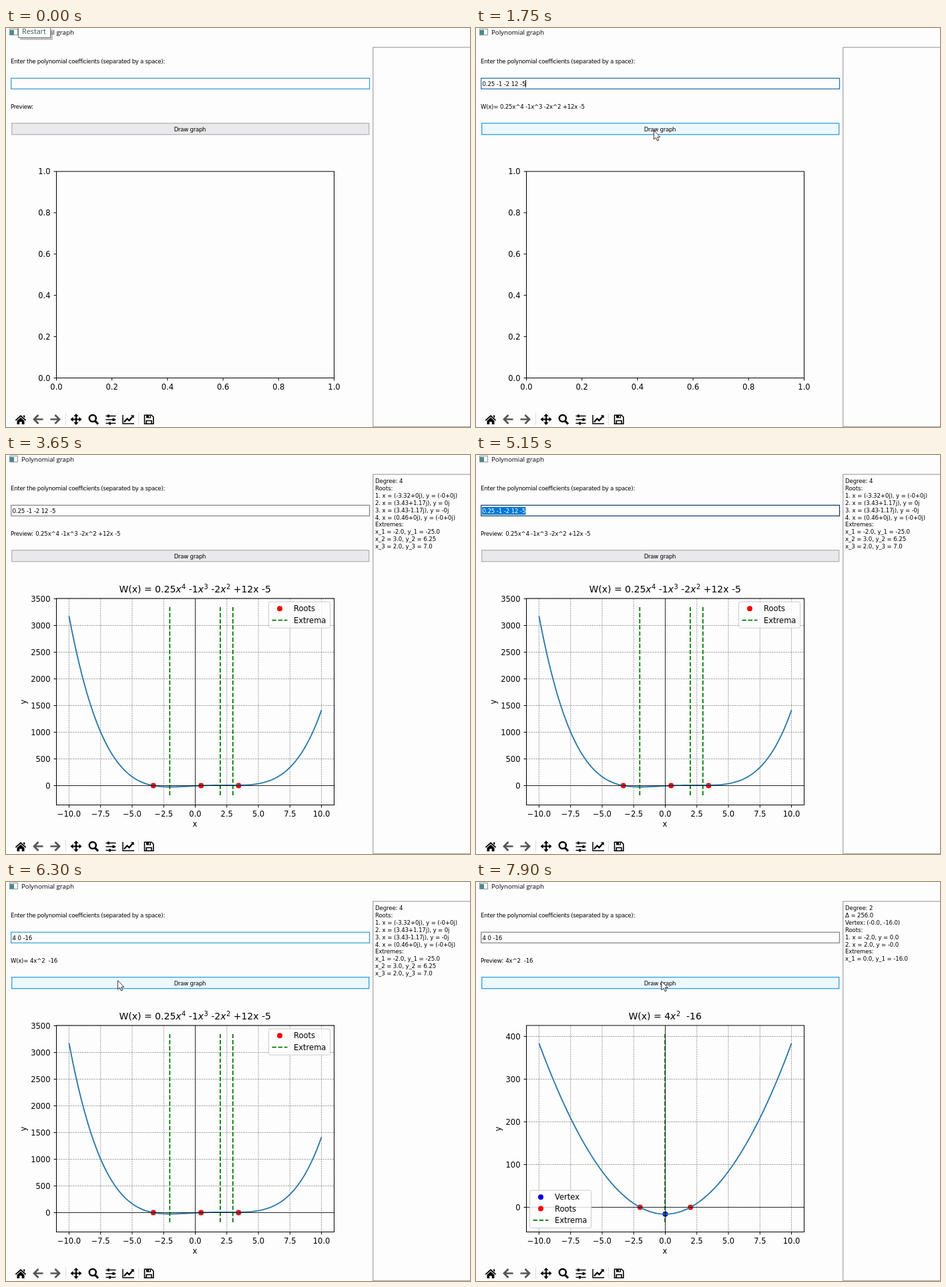
Recreate the animation shown at these times as an HTML page. Size 695x598 px, loop 8 s.

```html
<!DOCTYPE html>
<html lang="en">
<head>
<meta charset="utf-8">
<title>Polynomial graph</title>
<style>
html, body { margin: 0; width: 100%; height: 100%; overflow: hidden; background: #fdfdfd; }
svg { display: block; }
text { white-space: pre; fill: #000; }
.ui { font: 8.6px "DejaVu Sans", sans-serif; letter-spacing: -.28px; }
.num { letter-spacing: -.11px; }
.poly { letter-spacing: -.2px; }
.win { font: 9.75px "Open Sans", sans-serif; letter-spacing: -.04px; }
.tip { font: 10.8px "Open Sans", sans-serif; fill: #35555a; }
.plot text { font: 11.5px "DejaVu Sans", sans-serif; }
.plot .head { font-size: 14px; }
.mid { text-anchor: middle; }
.end { text-anchor: end; }
.grid { stroke: #808080; stroke-width: .7; stroke-dasharray: 2.4 1.1; }
.frame { fill: none; stroke: #000; stroke-width: 1; }
.zero { stroke: #000; stroke-width: .8; }
.curve { fill: none; stroke: #2c78a8; stroke-width: 1.85; stroke-linejoin: round; }
.ext { stroke: #007400; stroke-width: 1.75; stroke-dasharray: 6.4 2.8; }
.legend { fill: #fff; fill-opacity: .8; stroke: #ccc; }
.icon { fill: none; stroke: #000; }
</style>
</head>
<body>
<svg id="stage" width="695" height="598" viewBox="0 0 695 598"></svg>
<script>
const LOOP = 8000;
const FIRST = "0.25 -1 -2 12 -5", SECOND = "4 0 -16";
const BOX = { l: 75.5, r: 491.5, t: 215, b: 524.5 };
const SIZE = { w: BOX.r - BOX.l, h: BOX.b - BOX.t };

// ---- markup helpers
const label = (x, y, s, cls = "") => `<text x="${x}" y="${y}" class="${cls}">${s}</text>`;
const line = (x1, y1, x2, y2, cls) => `<line x1="${x1}" y1="${y1}" x2="${x2}" y2="${y2}" class="${cls}"/>`;
const dot = (x, y, fill) => `<circle cx="${x}" cy="${y}" r="4" fill="${fill}"/>`;
const path = (d, attrs) => `<path d="${d}" ${attrs}/>`;
const range = (from, to, step) =>
  Array.from({ length: Math.round((to - from) / step) + 1 }, (_, i) => from + i * step);
const minus = s => s.replace("-", "\u2212");

const xTick = (x, s) => line(x, BOX.b, x, BOX.b + 4, "frame") + label(x, 541.8, minus(s), "mid");
const yTick = (y, s) => line(BOX.l - 4, y, BOX.l, y, "frame") + label(66.5, y + 4.2, s, "end");
const frame = `<rect x="${BOX.l}" y="${BOX.t}" width="${SIZE.w}" height="${SIZE.h}" class="frame"/>`;

function emptyPlot() {
  return range(0, 5, 1).map(i => {
    const s = (i / 5).toFixed(1);
    return xTick(BOX.l + SIZE.w * i / 5, s) + yTick(BOX.b - SIZE.h * i / 5, s);
  }).join("") + frame;
}

function legend(x, y, items) {
  const h = items.length * 17.4 + 4.4;
  return `<rect x="${x}" y="${y}" width="92" height="${h}" rx="2.5" class="legend"/>` +
    items.map(([name, color], i) => {
      const cy = y + 10.3 + i * 17.3;
      return (color ? dot(x + 16.5, cy, color) : line(x + 5, cy, x + 28, cy, "ext")) +
        label(x + 37.5, cy + 4, name);
    }).join("");
}

// powers in the heading become raised digits after a slanted x
function heading(poly) {
  const body = poly.replace(/x\^(\d)/g,
    '<tspan font-style="italic">x</tspan><tspan dx=".5" dy="-5" font-size="9.8">$1</tspan><tspan dy="5">\u200b</tspan>');
  return label(283.2, 206, "W(x) = " + body, "mid head");
}

function graph(o) {
  const X = v => 283.5 + v * SIZE.w / 22;
  const Y = v => o.zero - v * o.scale;
  const f = x => o.coef.reduce((sum, c) => sum * x + c, 0);
  const xs = range(-10, 10, 2.5), ys = range(0, o.top, o.step);
  const pts = range(-10, 10, .2).map(x => X(x).toFixed(2) + "," + Y(f(x)).toFixed(2));
  return xs.map(x => line(X(x), BOX.t, X(x), BOX.b, "grid")).join("") +
    ys.map(y => line(BOX.l, Y(y), BOX.r, Y(y), "grid")).join("") +
    o.roots.map(x => dot(X(x), o.zero, "#f00000")).join("") +
    (o.vertex ? dot(X(o.vertex[0]), Y(o.vertex[1]), "#0000e0") : "") +
    `<polyline points="${pts.join(" ")}" class="curve"/>` +
    o.extrema.map(x => line(X(x) - .4, 510, X(x) - .4, 228, "ext")).join("") +
    line(BOX.l, o.zero, BOX.r, o.zero, "zero") + line(X(0), BOX.t, X(0), BOX.b, "zero") +
    xs.map(x => xTick(X(x), x.toFixed(1))).join("") +
    ys.map(y => yTick(Y(y), String(y))).join("") + frame +
    label(283, 557, "x", "mid") +
    `<text transform="translate(${o.labelX} 370) rotate(-90)" class="mid">y</text>` +
    heading(polyText(o.input)) + legend(...o.legend);
}

function polyText(input) {
  const c = input.trim().split(/\s+/).filter(s => s && !isNaN(s)).map(Number);
  return c.map((v, i) => {
    const p = c.length - 1 - i;
    if (!v && c.length > 1) return "";
    return (i && v > 0 ? "+" : "") + v + (p > 1 ? "x^" + p : p ? "x" : "");
  }).join(" ");
}

const report = lines => lines.map((s, i) => label(553, 42 + i * 10.9, s, "ui num")).join("");

const REPORTS = ["", report([
  "Degree: 4", "Roots:",
  "1. x = (-3.32+0j), y = (-0+0j)", "2. x = (3.43+1.17j), y = 0j",
  "3. x = (3.43-1.17j), y = -0j", "4. x = (0.46+0j), y = (-0+0j)",
  "Extremes:", "x_1 = -2.0, y_1 = -25.0", "x_2 = 3.0, y_2 = 6.25", "x_3 = 2.0, y_3 = 7.0"
]), report([
  "Degree: 2", "\u0394 = 256.0", "Vertex: (-0.0, -16.0)", "Roots:",
  "1. x = -2.0, y = 0.0", "2. x = 2.0, y = -0.0", "Extremes:", "x_1 = 0.0, y_1 = -16.0"
])];

const PLOTS = [emptyPlot(), graph({
  input: FIRST, coef: [.25, -1, -2, 12, -5], zero: 495.5, scale: .08, top: 3500, step: 500,
  roots: [-3.32, .46, 3.43], extrema: [-2, 2, 3], labelX: 30,
  legend: [393.5, 220, [["Roots", "#f00000"], ["Extrema"]]]
}), graph({
  input: SECOND, coef: [4, 0, -16], zero: 487.5, scale: .64, top: 400, step: 100,
  roots: [-2, 2], extrema: [0], vertex: [0, -16], labelX: 37,
  legend: [80.5, 462, [["Vertex", "#0000e0"], ["Roots", "#f00000"], ["Extrema"]]]
})];

const pen = (w, color = "#000") => `class="icon" stroke-width="${w}" style="stroke:${color}"`;
const TOOLBAR =
  path("M13.8 587.6L22 580L30.2 587.6L29 588.8L22 582.4L15 588.8ZM16.5 588.8L22 583.8L27.5 588.8V594H23.8V590.2H20.2V594H16.5ZM26 580.6h2.2v4l-2.2-2z", "") +
  path("M55.5 586.5H43M48.5 580L42 586.5L48.5 593", pen(2.7, "#555")) +
  path("M66.5 586.5H79M73.5 580L80 586.5L73.5 593", pen(2.7, "#555")) +
  path("M89.5 577V595M198.5 577V595", pen(1, "#ddd")) +
  path("M98 586.5H112M105 579.5V593.5", pen(2)) +
  path("M105 578l3.6 4h-7.2zM105 595l3.6-4h-7.2zM96.5 586.5l4-3.6v7.2zM113.5 586.5l-4-3.6v7.2z", "") +
  `<circle cx="129.8" cy="585" r="5" ${pen(2.5)}/>` +
  path("M133.2 588.6L138 593.6", pen(3)) +
  path("M149.5 581.5H164.5M149.5 587H164.5M149.5 592.5H164.5", pen(1.5)) +
  path("M152 579.5h3v4h-3zM159.5 585h3v4h-3zM154 590.5h3v4h-3z", "") +
  path("M175 580V593H192", pen(1.5)) +
  path("M177 590.5L181.5 585.5L184.5 588.3L190 582", pen(2.2)) +
  path("M186.8 580.2h4.8v4.8z", "") +
  path("M207.5 580.2H218L220.8 583V593.2H207.5ZM210.3 593V588.5H218V593", pen(1.6)) +
  path("M210 580h7v4.6h-7z", "") + path("M214 581h1.6v2.6h-1.6z", 'fill="#fdfdfd"');

const ARROW = "M.4 .6V14L3.5 11.2L5.6 16L7.7 15.1L5.7 10.4H9.8Z";

document.getElementById("stage").innerHTML = `
  <defs><clipPath id="cut"><rect id="cutBox" y="77" height="13"/></clipPath></defs>
  <rect x="5.5" y="1.5" width="12" height="9" fill="#fff" stroke="#8a9498"/>
  <rect x="6" y="3" width="6" height="7" fill="#4b8a8a"/>
  ${label(23, 10.3, "Polynomial graph", "win")}
  <g id="hint">
    <rect x="21" y="2" width="49" height="16" fill="#999" opacity=".6"/>
    <rect x="18.5" y="-3.5" width="48" height="18" fill="#fff" stroke="#777"/>
    ${label(24, 9.3, "Restart", "tip")}
  </g>
  ${label(7, 52.6, "Enter the polynomial coefficients (separated by a space):", "ui")}
  <rect id="field" x="7.7" y="75.3" width="536.8" height="16" fill="#fdfdfd" stroke-width="1.25"/>
  <text id="typed" x="9.5" y="87" class="ui num"></text>
  <rect id="mark" y="78" height="11.5" fill="#0078d7"/>
  <g clip-path="url(#cut)"><text id="marked" x="9.5" y="87" class="ui num" style="fill:#fff"></text></g>
  <rect id="caret" y="78" width="1" height="11" fill="#000"/>
  <text id="lead" x="7" y="120.8" class="ui"></text>
  <text id="preview" y="120.8" class="ui poly"></text>
  <rect id="button" x="8.7" y="142.7" width="535" height="17" stroke-width="1.25"/>
  ${label(275.5, 155, "Draw graph", "ui mid")}
  <rect x="549.8" y="29" width="160" height="568.7" fill="#fdfdfd" stroke="#8c8f94"/>
  ${REPORTS.map(r => `<g class="stepped">${r}</g>`).join("")}
  ${PLOTS.map(p => `<g class="plot">${p}</g>`).join("")}
  ${TOOLBAR}
  ${path(ARROW, 'id="arrow" fill="#fff" stroke="#222" stroke-width=".9"')}`;

// ---- timing tables
const GRAY = "#e9e8ea", HOVER = "#ebf8ff", DOWN = "#cce8fb";
const EDGE = "#b2b2b2", BLUE = "#2a9be0", DEEP = "#1a86d6";
const BUTTON = [
  [0, GRAY, EDGE], [1500, GRAY, EDGE], [1650, HOVER, BLUE], [1880, HOVER, BLUE],
  [1990, DOWN, DEEP], [2200, DOWN, DEEP], [2250, "#e0f3ff", DEEP], [2500, HOVER, BLUE],
  [3580, HOVER, BLUE], [3650, GRAY, EDGE], [6020, GRAY, EDGE], [6150, HOVER, BLUE],
  [6740, HOVER, BLUE], [6840, DOWN, DEEP], [6950, DOWN, DEEP], [7150, HOVER, BLUE], [LOOP, HOVER, BLUE]
];
const FIELD = [[0, "#3a9cc8"], [250, "#2a70a8"], [1900, "#858585"], [4450, "#123d63"], [5300, "#3f9fd0"], [6750, "#858585"]];
const POINTER = [
  [[1100, 285, 94], [1250, 267, 128.5], [1350, 267, 128.5], [1550, 268, 144], [1750, 266, 153],
   [3150, 266, 153], [3300, 310, 152], [3500, 480, 151], [3640, 554, 150]],
  [[5700, 1, 95], [5900, 75, 128], [6100, 167, 147], [7350, 167, 147], [7500, 195, 150],
   [7700, 262, 152], [7800, 279, 152], [7900, 277.5, 148], [LOOP, 277.5, 148]]
];

// ---- playback
const $ = id => document.getElementById(id);
const set = (id, attrs) => { for (const k in attrs) $(id).setAttribute(k, attrs[k]); };
const show = (el, on) => { el.style.display = on ? "" : "none"; };
const hex = (c, i) => parseInt(c.slice(i, i + 2), 16);
const mix = (a, b, k) => typeof a === "number" ? a + (b - a) * k
  : `rgb(${[1, 3, 5].map(i => Math.round(hex(a, i) + (hex(b, i) - hex(a, i)) * k))})`;
const held = (steps, t) => steps.filter(s => s[0] <= t).pop()[1];

function at(keys, t) {
  const i = Math.max(1, keys.findIndex(k => k[0] > t));
  const a = keys[i - 1], b = keys[i];
  return a.slice(1).map((v, j) => mix(v, b[j + 1], (t - a[0]) / (b[0] - a[0])));
}

function typedAt(t) {
  if (t < 250) return "";
  if (t < 500) return FIRST[0];
  if (t < 5300) return FIRST.slice(0, 2 + Math.floor((t - 500) / 42));
  return SECOND.slice(0, 1 + Math.floor((t - 5300) / 50));
}

const shown = {};
function write(id, s) {
  if (shown[id] !== s) $(id).textContent = shown[id] = s;
}

function draw(t) {
  const input = typedAt(t);
  const stage = t < 2250 ? 0 : t < 6950 ? 1 : 2;
  const wx = (t >= 250 && t < 2250) || (t >= 5300 && t < 6950);
  show($("hint"), t < 250);
  write("typed", input);
  write("marked", input);
  write("lead", wx ? "W(x)=" : "Preview:");
  write("preview", polyText(input));
  set("preview", { x: wx ? 36 : 44.3 });
  set("field", { stroke: held(FIELD, t) });

  const width = input ? $("typed").getComputedTextLength() : 0;
  const end = 9.5 + width;
  const part = t < 4600 || t >= 5300 ? 0 : Math.min(16, Math.ceil((t - 4600) / 31)) / 16;
  const sel = { x: end - width * part - .5, width: part ? width * part + .5 : 0 };
  set("mark", sel);
  set("cutBox", sel);
  set("caret", { x: Math.round(end) });
  show($("caret"), (t >= 250 && t < 1900) || (t >= 4450 && t < 4600) || (t >= 5300 && t < 6300));

  const [fill, stroke] = at(BUTTON, t);
  set("button", { fill, stroke });
  document.querySelectorAll(".stepped").forEach((g, i) => show(g, i === stage));
  document.querySelectorAll(".plot").forEach((g, i) => show(g, i === stage));

  const track = POINTER.find(p => t >= p[0][0] && t < p[p.length - 1][0]);
  show($("arrow"), track);
  if (track) set("arrow", { transform: `translate(${at(track, t).join(" ")})` });
}

const start = performance.now();
function tick() {
  draw((performance.now() - start) % LOOP);
  requestAnimationFrame(tick);
}
tick();
</script>
</body>
</html>
```
